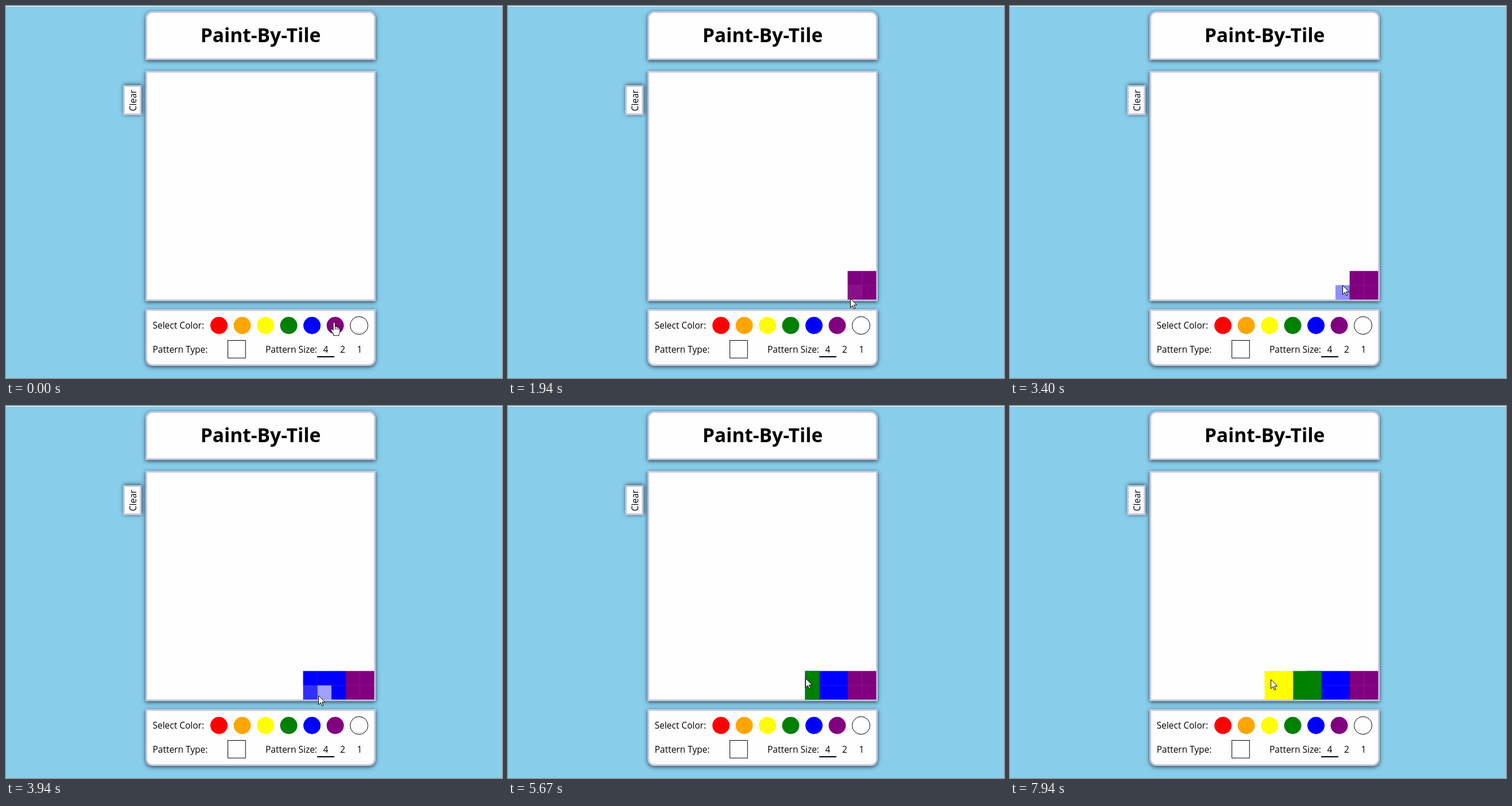
An HTML page that plays this animation: 864 by 648 pixels, repeating every 8000 ms.

```html
<!DOCTYPE html>
<html lang="en">
<head>
<meta charset="utf-8">
<title>Drawing grid</title>
<style>
  html, body { margin: 0; width: 100%; height: 100%; overflow: hidden; background: #88cdea; }
  body { position: relative; border-top: 1px solid #f4f9fc; box-sizing: border-box; }
  .panel {
    position: absolute; box-sizing: border-box; left: 243px; width: 401px;
    margin-top: -1px; background: #fefefe; border: 3px solid #c8c8e0;
    box-shadow: 0 2px 7px rgba(0, 0, 0, .65);
  }
  #header { top: 9px; height: 85px; border-radius: 12px 12px 0 0; }
  #board { top: 113px; height: 401px; }
  #controls { top: 528px; height: 98.5px; border-radius: 0 0 12px 12px; }
  #clear { left: 204px; top: 138px; width: 32px; height: 52px; box-shadow: 1px -1px 7px rgba(0, 0, 0, .65); }
  svg { position: absolute; left: 0; top: -1px; }
  text { font: 15.5px "Open Sans", "Noto Sans", sans-serif; }
  .title { font-size: 33.5px; font-weight: 700; }
  .mid { text-anchor: middle; }
  .outline { fill: #fefefe; stroke: #000; }
</style>
</head>
<body>
<div class="panel" id="header"></div>
<div class="panel" id="board"></div>
<div class="panel" id="controls"></div>
<div class="panel" id="clear"></div>
<svg width="864" height="648" viewBox="0 0 864 648">
  <text class="title mid" x="443.5" y="62.5">Paint-By-Tile</text>
  <text class="mid" transform="translate(226.5 164.5) rotate(-90)">Clear</text>
  <text x="255.5" y="562">Select Color:</text>
  <text x="255.5" y="604">Pattern Type:</text>
  <text x="452" y="604">Pattern Size:</text>
  <text class="mid" x="557" y="604">4</text>
  <text class="mid" x="586.5" y="604">2</text>
  <text class="mid" x="616" y="604">1</text>
  <path d="M542 611h30" stroke="#000" stroke-width="2"/>
  <rect class="outline" x="386.5" y="582.5" width="30.7" height="30.7"/>
  <circle class="outline" cx="615" cy="556.5" r="15.5"/>
  <g id="swatches"></g>
  <g id="cells"></g>
  <g id="cursor" fill="#fff" stroke="#000" stroke-linejoin="round">
    <path id="arrow" d="M.5.5V16.3L4.2 12.8 6.7 18.6 9 17.6 6.5 11.9H11.6Z"/>
    <path id="hand" d="M-2 2Q-2 0-.3 0T1.4 2V8.5Q1.6 7 3 7T4.7 9Q5 8 6.2 8.2T7.6 10Q9.8 9.5 9.8 12V16Q9.8 18.5 8 20.5V23H-1.5V20.5Q-4.5 17-6 13.5Q-6.5 11.5-5 11.3T-2 14ZM1.4 8.5V13M4.7 9.5V13M7.6 10.5V13"/>
  </g>
</svg>
<script>
const LOOP = 8000, STEP = 200 / 3, FADE = 250, TRAVEL = 400;
const CELL = 24.7, RIGHT = 641, BOTTOM = 511, SWATCH_Y = 556.5;
const COLORS = ["red", "orange", "yellow", "green", "blue", "purple"];
const $ = id => document.getElementById(id);
const swatchX = i => 371 + i * 40.5;

// One round per colour: leave the swatch, paint two rows between two columns
// (counted from the right) at a steady pace, rest, then go to the next swatch.
const ROUNDS = [
  { color: "purple", leave: 420, enter: 950, pace: 300, from: 1, to: 2, rest: [575, 536], go: 2150 },
  { color: "blue", leave: 3000, enter: 3345, pace: 110, from: 3, to: 5, rest: [544, 504], go: 4340 },
  { color: "green", leave: 4970, enter: 5270, pace: 270, from: 5, to: 6, rest: [497, 506], go: 6350 },
  { color: "yellow", leave: 6930, enter: 7160, pace: 195, from: 8, to: 7, rest: [453, 475], go: LOOP }
];

function add(parent, tag, attributes) {
  const node = document.createElementNS("http://www.w3.org/2000/svg", tag);
  for (const name in attributes) node.setAttribute(name, attributes[name]);
  return $(parent).appendChild(node);
}

const swatches = COLORS.map((fill, i) =>
  add("swatches", "circle", { cx: swatchX(i), cy: SWATCH_Y, r: 15, fill }));

const cellCenter = (col, row) => [RIGHT - (col - .5) * CELL, BOTTOM - (row - .5) * CELL];

// Up the first column, across the top row, down the last column.
function trail({ from, to, rest }) {
  const points = [cellCenter(from, 1)], side = Math.sign(to - from);
  for (let col = from; col !== to + side; col += side) points.push(cellCenter(col, 2));
  return [...points, cellCenter(to, 1), rest];
}

const path = [], strokes = [];

function paint([x, y], fill, start) {
  if (y > BOTTOM) return;
  const col = Math.ceil((RIGHT - x) / CELL), row = Math.ceil((BOTTOM - y) / CELL);
  const node = add("cells", "rect", {
    x: RIGHT - col * CELL, y: BOTTOM - row * CELL, width: CELL + .4, height: CELL + .4, fill
  });
  strokes.push({ start, node });
}

let arrival = 0;
for (const round of ROUNDS) {
  const { color, leave, enter, pace, rest, go } = round;
  const swatch = [swatchX(COLORS.indexOf(color)) - 2, 551];
  path.push({ time: arrival, point: swatch }, { time: leave, point: swatch });
  trail(round).forEach((point, i) => {
    const time = enter + i * pace;
    path.push({ time, point });
    paint(point, color, time - pace / 2);
  });
  path.push({ time: go, point: rest });
  arrival = go + TRAVEL;
}

function pointerAt(t) {
  const i = Math.max(1, path.findIndex(p => p.time >= t));
  const a = path[i - 1], b = path[i];
  const k = Math.max(0, (t - a.time) / (b.time - a.time || 1));
  return a.point.map((v, axis) => v + (b.point[axis] - v) * k);
}

const swatchUnder = ([x, y]) => COLORS.findIndex((c, i) => Math.hypot(x - swatchX(i), y - SWATCH_Y) < 15.5);
const hovers = (i, t) => t > 60 && swatchUnder(pointerAt(t)) === i;

function draw() {
  const t = Math.floor(performance.now() % LOOP / STEP + .02) * STEP;
  const point = pointerAt(t), overSwatch = swatchUnder(point) >= 0;
  for (const { start, node } of strokes)
    node.setAttribute("opacity", Math.min(1, Math.max(0, (t - start) / FADE)));
  swatches.forEach((node, i) => {
    const glow = (hovers(i, t) + hovers(i, t - STEP)) / 2;
    node.style.filter = glow ? `drop-shadow(1px 2px 2px rgba(0,0,0,${glow * .65}))` : "none";
  });
  $("cursor").setAttribute("transform", `translate(${point.map(Math.round)})`);
  $("arrow").style.display = overSwatch ? "none" : "";
  $("hand").style.display = overSwatch ? "" : "none";
  requestAnimationFrame(draw);
}
draw();
</script>
</body>
</html>
```
